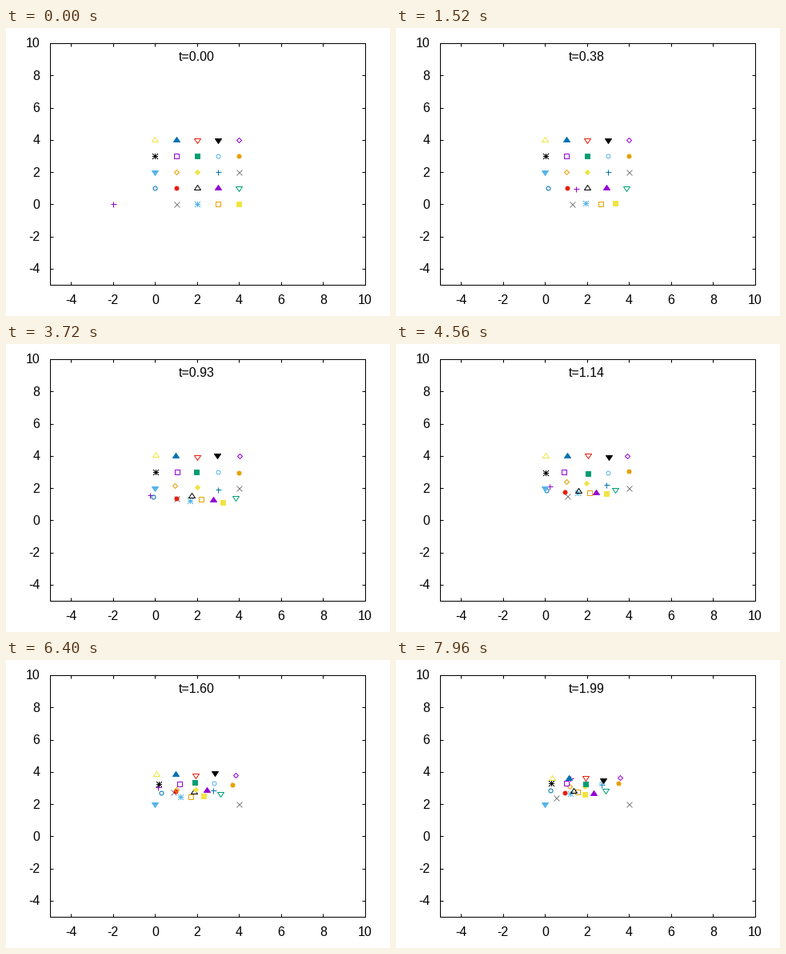
These frames come from a looping animation (480x360 px, 8 s). A matplotlib script:

```python
import numpy as np
import matplotlib.pyplot as plt
from matplotlib.animation import FuncAnimation
from matplotlib.path import Path

W, H, DPI = 480, 360, 100
FRAMES, STEP = 200, 40
PX = 72 / DPI  # one pixel in points
LEFT, RIGHT, TOP, BOTTOM = 55, 449, 19, 321
TIC = 4

COLORS = ["#9400d3", "#009e73", "#56b4e9", "#e69f00",
          "#f0e442", "#0072b2", "#e51e10", "#000000"]
GRAY = "#808080"

plt.rcParams["font.family"] = "Liberation Sans"
fig = plt.figure(figsize=(W / DPI, H / DPI), dpi=DPI, facecolor="white")
ax = fig.add_axes([0, 0, 1, 1])
ax.set_xlim(0, W)
ax.set_ylim(H, 0)
ax.axis("off")


def line(xs, ys):
    ax.plot(xs, ys, color="black", lw=PX, solid_capstyle="butt")


def label(x, y, text, ha="center"):
    return ax.text(x, y, text, size=16 * PX, ha=ha, va="baseline")


# frame, tics and tic labels
line([LEFT, RIGHT, RIGHT, LEFT, LEFT], [TOP, TOP, BOTTOM, BOTTOM, TOP])
for v in range(-4, 11, 2):
    x = LEFT + (v + 5) * (RIGHT - LEFT) / 15
    y = BOTTOM - (v + 5) * (BOTTOM - TOP) / 15
    for a, b in ((TOP, TOP + TIC), (BOTTOM, BOTTOM - TIC)):
        line([x, x], [a, b])
    for a, b in ((LEFT, LEFT + TIC), (RIGHT, RIGHT - TIC)):
        line([a, b], [y, y])
    label(x, 345, str(v))
    label(42.5, y + 5.5, str(v), "right")
clock = label(238.5, 41, "t=0.00")


# marker shapes
def polygon(*points):
    return Path(points + points[:1], closed=True)


def star():
    ends = [(1, 0), (0, 1), (1, 1), (1, -1)]
    pts = [p for x, y in ends for p in ((x, y), (-x, -y))]
    return Path(pts, [Path.MOVETO, Path.LINETO] * len(ends))


UP = polygon((0, 4), (-4, -2), (4, -2))
DOWN = polygon((0, -4), (-4, 2), (4, 2))
DIAMOND = polygon((0, 1), (1, 0), (0, -1), (-1, 0))
# (shape, filled, size in pixels)
MARKS = [("+", False, 7), ("x", False, 7), (star(), False, 7),
         ("s", False, 6), ("s", True, 6), ("o", False, 5), ("o", True, 5),
         (UP, False, 8), (UP, True, 8), (DOWN, False, 8), (DOWN, True, 8),
         (DIAMOND, False, 6), (DIAMOND, True, 6)]

dots = []
for n in range(25):
    shape, filled, size = MARKS[n % len(MARKS)]
    color = GRAY if shape == "x" else COLORS[n % len(COLORS)]
    dots += ax.plot([0], [0], ls="none", marker=shape, ms=size * PX, mew=PX,
                    mec=color, mfc=color if filled else "none", zorder=3)

# 5 x 5 lattice that is drawn together into a loose cluster, lowest row first
col, row = np.tile(np.arange(5), 5), np.repeat(np.arange(5), 5)
lattice = np.column_stack([col, row]).astype(float)
goal = np.column_stack([0.3 + np.minimum(0.45 + 0.2 * row, 0.8) * col,
                        2.6 + 0.25 * row])
start, end = 0.25 + 0.25 * row, 1.75 + 0.08 * row
pinned = (row == 2) & (col % 4 == 0)

rng = np.random.default_rng(4)
swing = rng.uniform(-0.3, 0.3, (25, 2)) * (1 - 0.15 * row)[:, None]
rate = rng.uniform(0.8, 1.6, (25, 2))

# the incoming particle bounces between these points (t, x, y)
BOUNCES = np.array([(0, -2, 0), (0.21, -0.5, 0), (0.4, 1.7, 1.05),
                    (0.9, -0.3, 1.5), (1.14, 0.2, 2.1), (1.34, -0.6, 2.7),
                    (1.99, 1.2, 3.6)])


def smooth(u):
    u = np.clip(u, 0, 1)
    return u * u * (3 - 2 * u)


def positions(now):
    pull = smooth((now - start) / (end - start))[:, None]
    pos = lattice + (goal - lattice) * pull
    # the impact squeezes the lower rows sideways
    squeeze = 0.7 * np.exp(-((now - 0.58) / 0.22) ** 2 - 1.5 * row)
    pos[:, 0] += (1.8 - pos[:, 0]) * squeeze
    # each particle rattles once the disturbance reaches it
    age = (now - 0.25 - 0.1 * row)[:, None]
    pos += swing * smooth(age / 0.5) * np.sin(2 * np.pi * rate * age)
    pos[pinned] = lattice[pinned]
    t, x, y = BOUNCES.T
    pos[0] = np.interp(now, t, x), np.interp(now, t, y)
    return pos


def draw(n):
    now = n / 100
    clock.set_text(f"t={now:.2f}")
    pixels = np.round((186.4, 220.3) + positions(now) * (26.27, -20.1))
    for dot, (x, y) in zip(dots, pixels):
        dot.set_data([x], [y])
    return [clock] + dots


anim = FuncAnimation(fig, draw, frames=FRAMES, interval=STEP,
                     init_func=lambda: draw(0), repeat=True, repeat_delay=0)
plt.show()
```
